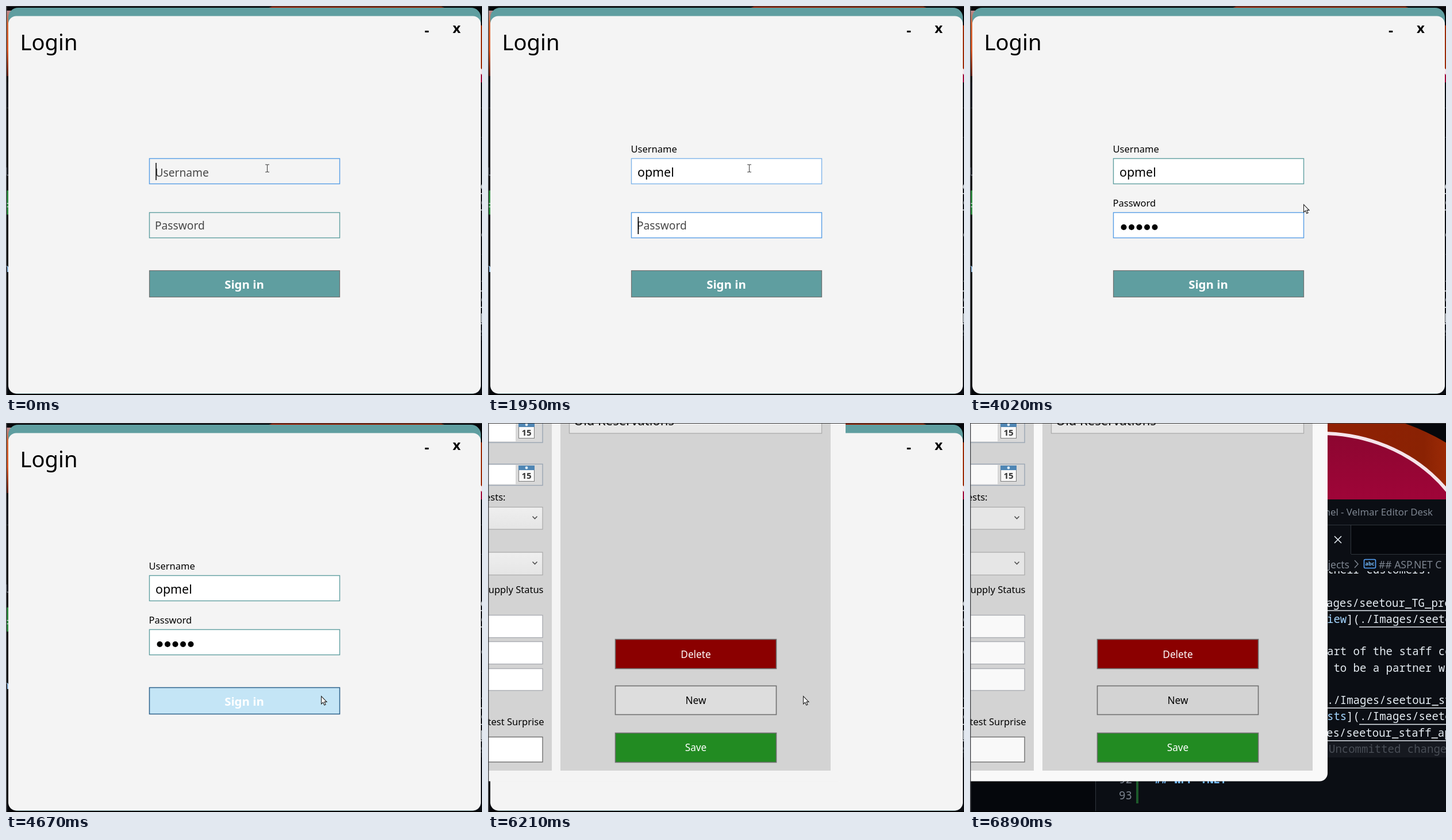
An HTML page that plays this animation: 828x677 px, repeating every 7590 ms.

```html
<!DOCTYPE html>
<html lang="en">
<head>
<meta charset="utf-8">
<title>Login</title>
<style>
html, body { margin: 0; width: 100%; height: 100%; overflow: hidden; background: #05070b; }
svg { display: block; width: 828px; height: 677px; font-family: "Noto Sans", "Open Sans", sans-serif; }
text { white-space: pre; }
.mono { font: 19px "Noto Sans Mono", "DejaVu Sans Mono", monospace; fill: #e6edf3; }
.link { stroke: #e6edf3; stroke-width: 1.6; }
.blue { fill: #79c0ff; }
.sky { fill: #a5d6ff; }
.grey { fill: #7d8590; }
.rule { stroke: #30363d; }
.mid { text-anchor: middle; }
.end { text-anchor: end; }
.label { font-size: 16.5px; }
.hint { font-size: 19.2px; fill: #484848; }
.field { fill: #f4f4f4; stroke: #5f9ea0; stroke-width: 1.4; }
.field.white { fill: #fff; }
.field.hover { stroke: #7eb4ea; }
.field.focus { stroke: #569de5; }
.caret { fill: #000; }
.sign { fill: #5f9ea0; stroke: #707070; stroke-width: 1.2; }
.sign.hover { fill: #bee6fd; stroke: #3c7fb1; }
.sign.down { fill: #c4e5f6; stroke: #2c628b; stroke-width: 1.5; }
.sign.off { fill: #f4f4f4; stroke: #adb2b5; stroke-width: 1.5; }
.btn { stroke: #707070; stroke-width: 1.6; }
.action { font-size: 17.2px; text-anchor: middle; fill: #fff; }
.box { fill: #fff; stroke: #abadb3; stroke-width: 1.4; }
.combo { fill: url(#combo); stroke: #acacac; stroke-width: 1.3; }
.panel { fill: #d3d3d3; }
.page { fill: #f4f4f4; }
.new { fill: #ddd; }
.late .page, .late .box { fill: #f9f9f9; }
.late .new { fill: #d3d3d3; }
.late .combo { fill: #e6e6e6; }
</style>
</head>
<body>
<svg viewBox="0 0 828 677">
  <defs>
    <linearGradient id="combo" x2="0" y2="1">
      <stop stop-color="#efefef"/><stop offset="1" stop-color="#e5e5e5"/>
    </linearGradient>
    <linearGradient id="glow" x2="0" y2="1">
      <stop stop-color="#8c0630"/><stop offset=".35" stop-color="#a8043c"/><stop offset="1" stop-color="#b8054c"/>
    </linearGradient>
    <linearGradient id="rim" x2="1" y2="0">
      <stop stop-color="#a01c06"/><stop offset=".75" stop-color="#8a2203"/><stop offset="1" stop-color="#d9480f"/>
    </linearGradient>
    <linearGradient id="flame" x2="0" y2="1">
      <stop stop-color="#b98a90"/><stop offset=".2" stop-color="#d9622c"/><stop offset=".6" stop-color="#e0521a"/><stop offset="1" stop-color="#5a1408"/>
    </linearGradient>
    <clipPath id="photo"><path d="M0 0H828V133H0z"/></clipPath>
    <clipPath id="code"><path d="M0 258H828V677H0z"/></clipPath>
    <g id="calendar">
      <rect x="53.5" y=".5" width="27" height="27" fill="#f8f8f8" stroke="#7c7c7c"/>
      <path d="M53 0h28v8h-28z" fill="#4f86b4"/>
      <circle cx="67" cy="4" r="2.4" fill="#dcebf7"/>
      <text x="67" y="22.5" font-size="15" font-weight="700" fill="#333" class="mid">15</text>
    </g>
    <path id="chevron" d="M-4-2L0 2L4-2" fill="none" stroke="#505050" stroke-width="1.6"/>
  </defs>

  <!-- desktop behind the windows -->
  <rect width="828" height="677" fill="#05070b"/>
  <g clip-path="url(#photo)">
    <ellipse cx="610" cy="260" rx="359" ry="284" fill="url(#rim)"/>
    <ellipse cx="610" cy="260" rx="272" ry="242" fill="url(#glow)" stroke="#f6e4ea" stroke-width="6"/>
    <path d="M0 8h250v114H0z" fill="url(#flame)"/>
  </g>
  <path d="M0 133H828V677H0z" fill="#0b0e14"/>
  <path d="M663 178H828V228H663zM0 178H218V677H0z" fill="#05070c"/>
  <path class="rule" d="M0 177.5H828M662.5 178V228M663 228.5H828M218.5 228V677"/>
  <path d="M0 321h5v42H0z" fill="#238636"/>
  <path d="M0 343.5h5M0 349.5h5" stroke="#e6edf3"/>
  <text x="-5" y="295" class="mono grey">1</text>
  <text x="-6" y="463" class="mono sky">n</text>
  <g class="grey">
    <text x="805" y="161" font-size="16.8" class="end">mel - Velmar Editor Desk</text>
    <text x="660" y="253" font-size="17.5" class="end">projects</text>
    <text x="711" y="253" font-size="17.5">## ASP.NET C</text>
  </g>
  <path d="M634 197l12 12M646 197l-12 12" stroke="#e6edf3" stroke-width="1.6"/>
  <path d="M669 239l6 6.500l-6 6.500" fill="none" stroke="#7d8590" stroke-width="1.5"/>
  <rect x="685.500" y="237.500" width="20" height="15" rx="2" fill="none" stroke="#58a6ff" stroke-width="1.6"/>
  <text x="695.500" y="248" font-size="9" font-weight="700" class="mid blue">abc</text>
  <path d="M600 555H828V582H600z" fill="#161920"/>
  <g class="mono" clip-path="url(#code)">
    <text x="621" y="262">their customers.</text>
    <text x="620" y="320">ages/seetour_TG_prev</text>
    <text x="621" y="348"><tspan class="sky">iew</tspan>](./Images/seetour</text>
    <text x="621" y="404">art of the staff co</text>
    <text x="621" y="433"> to be a partner wi</text>
    <text x="621" y="489">./Images/seetour_st</text>
    <text x="621" y="517"><tspan class="sky">sts</tspan>](./Images/seetour</text>
    <text x="620" y="546">es/seetour_staff_app</text>
    <text x="624" y="574" fill="#484d55">Uncommitted changes</text>
    <text x="259" y="627" class="grey">92</text>
    <text x="321" y="627" class="blue" font-weight="700">## WPF .NET</text>
    <text x="259" y="655" class="grey">93</text>
  </g>
  <path class="link" d="M600 326.500H828M677 355H828M600 496H828M677 524.500H828M600 553H828"/>
  <path d="M289 600h4v62h-4z" fill="#1d5a2b"/>
  <path d="M0 675.500H828V677H0z" fill="#000"/>

  <!-- login window -->
  <g id="login">
    <rect x="4" y="3" width="822" height="672" rx="17" fill="#5f9ea0"/>
    <rect x="4" y="17.500" width="822" height="657" rx="14" fill="#f4f4f4"/>
    <text x="24.500" y="77" font-size="38.200">Login</text>
    <text x="732" y="51" font-size="25" font-weight="700" class="mid">-</text>
    <text x="784" y="47" font-size="24" font-weight="700" class="mid">x</text>

    <rect id="userBox" class="field" x="249.500" y="265.500" width="331" height="44"/>
    <path data-on="690-1820" d="M261 269h91v34h-91zM451.500 275.500h7v14.500h-7z" fill="#fff"/>
    <text class="hint" data-on="0-690" x="259.500" y="297">Username</text>
    <text class="label" data-on="790-7590" x="248.500" y="255">Username</text>
    <text id="user" x="260" y="297" font-size="21.400"></text>
    <rect id="userCaret" class="caret" y="273" width="1.500" height="30"/>

    <rect id="passBox" class="field" x="249.500" y="359.500" width="331" height="44"/>
    <text class="hint" data-on="0-2370" x="259" y="389">Password</text>
    <text class="label" data-on="2430-7590" x="248.500" y="349">Password</text>
    <g id="dots"></g>
    <rect id="passCaret" class="caret" y="367" width="1.700" height="30"/>

    <rect id="sign" class="sign" x="249.500" y="460.500" width="331" height="46"/>
    <text x="414.500" y="492" font-size="20.400" font-weight="700" fill="#fff" class="mid">Sign in</text>
  </g>

  <!-- main window -->
  <g id="main">
    <rect class="page" x="-40" y="-40" width="662" height="663.500" rx="14"/>
    <path class="panel" d="M0 0H111V605H0zM126 0H596V605H126z"/>
    <rect class="combo" x="141.500" y="-20" width="439" height="38"/>
    <text x="149" y="3.500" font-size="22">Old Reservations</text>

    <rect x="-20" y="-8" width="115" height="42" fill="#d8d8d8" stroke="#9aa5b3" stroke-width="1.4"/>
    <rect x="-20" y="71.500" width="115" height="37" fill="#d8d8d8" stroke="#9aa5b3" stroke-width="1.4"/>
    <path class="box" style="stroke:none" d="M0 0H48V32H0zM0 73H48V106.500H0z"/>
    <use href="#calendar" y="-1"/>
    <use href="#calendar" y="74"/>
    <text class="label end" x="30.500" y="135">Guests:</text>
    <rect class="combo" x="-20" y="146.500" width="115" height="38.500"/>
    <rect class="combo" x="-20" y="225" width="115" height="39.500"/>
    <use href="#chevron" x="81.500" y="164.500"/>
    <use href="#chevron" x="81.500" y="243.500"/>
    <text class="label end" x="96.500" y="296">Supply Status</text>
    <rect class="box" x="-20" y="334.500" width="115" height="39"/>
    <rect class="box" x="-20" y="380.500" width="115" height="39"/>
    <rect class="box" x="-20" y="427.500" width="115" height="38"/>
    <text class="label end" x="97.500" y="526">Latest Surprise</text>
    <rect class="box" style="stroke:#6f6f6f" x="-20" y="546.500" width="115" height="43.500"/>

    <rect class="btn" x="221.500" y="376.500" width="280" height="51" fill="#8b0000"/>
    <rect class="btn new" x="221.500" y="457.500" width="280" height="50"/>
    <rect class="btn" x="221.500" y="539.500" width="280" height="51" fill="#228b22"/>
    <text class="action" x="361.500" y="409">Delete</text>
    <text class="action" x="361.500" y="489" style="fill:#000">New</text>
    <text class="action" x="361.500" y="571">Save</text>
  </g>

  <path d="M0 .5H828" stroke="#3a3a3c"/>
  <path d="M.75 0V677" stroke="#55565a" stroke-width="1.500"/>

  <path id="beam" d="M-3.500-6.500h2.500l1 1l1-1h2.500M0-5.500v11M-3.500 6.500h2.500l1-1l1 1h2.500" fill="none" stroke="#444" stroke-width="1.100"/>
  <path id="arrow" d="M.5.500V14L3.600 11.200L5.800 16L8 15L5.900 10.400H10z" fill="#fff" stroke="#222" stroke-width="1.100"/>
</svg>
<script>
const LOOP = 7590;
const NAME = "opmel";
const nameKeys = [690, 980, 1120, 1340, 1450];
const passKeys = [2370, 2610, 2830, 2950, 3070];
const sweep = [[478, 288], [530, 312], [580, 345], [622, 395], [648, 450], [656, 503], [646, 537], [608, 526], [572, 500], [548, 475]];
const leave = [[566, 492], [590, 522], [614, 570], [636, 650], null];

const $ = id => document.getElementById(id);
const timed = [...document.querySelectorAll("[data-on]")].map(el => [el, ...el.dataset.on.split("-").map(Number)]);
const show = (el, on) => { el.style.display = on ? "" : "none"; };
const between = (t, a, b) => t >= a && t < b;
const typed = (keys, t) => keys.filter(k => k <= t).length;
const inside = (p, top, bottom) => !!p && p[0] >= 249 && p[0] <= 581 && p[1] >= top && p[1] <= bottom;

for (let i = 0; i < 5; i++) {
  const dot = document.createElementNS("http://www.w3.org/2000/svg", "circle");
  dot.setAttribute("cx", 267.5 + 13.5 * i);
  dot.setAttribute("cy", 385);
  dot.setAttribute("r", 5);
  $("dots").append(dot);
}

// Position along a list of stops spread evenly from a to b
function stop(list, t, a, b) {
  const i = Math.floor((t - a) / (b - a) * (list.length - 1) + 1e-6);
  return list[Math.min(i, list.length - 1)];
}

function pointer(t) {
  if (between(t, 690, 1820)) return null;
  if (t < 3910) return [454.5, 282.5];
  if (t < 6670) return stop(sweep, t, 3910, 4370);
  return stop(leave, t, 6670, 6890);
}

function draw(t) {
  const p = pointer(t);
  const overUser = inside(p, 265, 310), overPass = inside(p, 359, 404);
  const onText = t < 6210 && (overUser || overPass);

  show($("login"), t < 6260);
  show($("main"), t >= 6210);
  $("main").classList.toggle("late", t >= 6260);
  for (const [el, a, b] of timed) show(el, between(t, a, b));

  if (t < 6260) {
    const user = $("user"), count = typed(passKeys, t);
    user.textContent = NAME.slice(0, typed(nameKeys, t));
    $("userCaret").setAttribute("x", 260.3 + user.getComputedTextLength());
    show($("userCaret"), t < 70 || between(t, 580, 1820));
    [...$("dots").children].forEach((dot, i) => show(dot, i < count));
    $("passCaret").setAttribute("x", 260.5 + 13.4 * count);
    show($("passCaret"), between(t, 1950, 3760));

    const a = $("userBox").classList, b = $("passBox").classList, s = $("sign").classList;
    a.toggle("focus", t < 1950);
    a.toggle("hover", t >= 1950 && overUser);
    a.toggle("white", t >= 1820);
    b.toggle("focus", between(t, 1950, 4580));
    b.toggle("white", t >= 1950);
    s.toggle("hover", t < 4580 && inside(p, 460, 507));
    s.toggle("down", between(t, 4580, 6000));
    s.toggle("off", t >= 6000);
  }

  show($("beam"), p && onText);
  show($("arrow"), p && !onText);
  if (p) $(onText ? "beam" : "arrow").setAttribute("transform", `translate(${p})`);
}

function frame() {
  draw(performance.now() % LOOP);
  requestAnimationFrame(frame);
}
frame();
</script>
</body>
</html>
```
